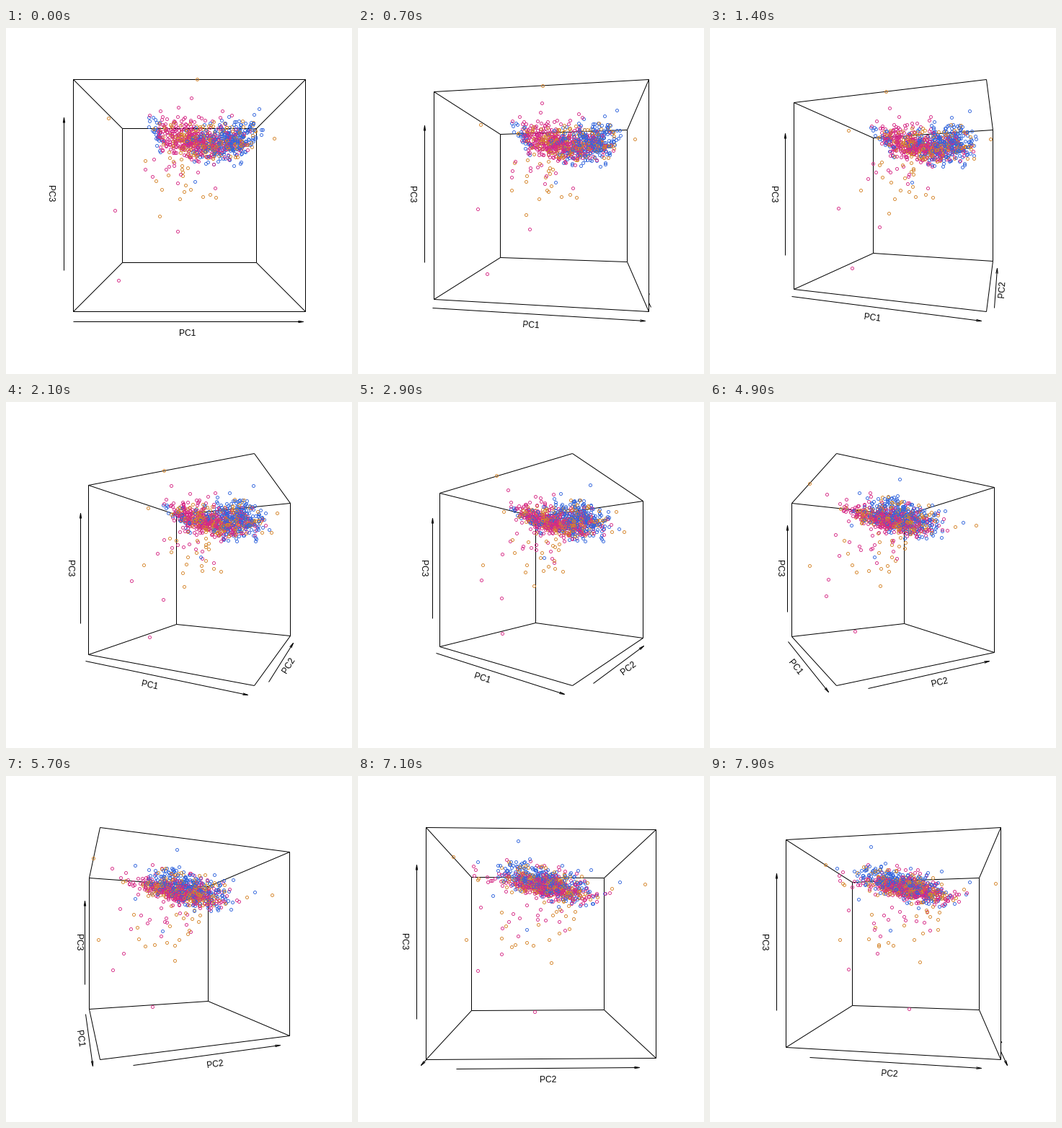
A matplotlib script that plays this animation: 480 by 480 pixels, repeating every 8 s.

```python
import itertools

import matplotlib.pyplot as plt
import numpy as np
from matplotlib.animation import FuncAnimation
from matplotlib.collections import LineCollection, PolyCollection

FRAMES, INTERVAL, STEP = 80, 100, 1.25      # degrees turned per frame
SIZE, DPI = 480, 96
PX = 72 / DPI                               # one pixel in points
CX, CY, HALF = 254.4, 232.8, 160.9          # plot centre, half box height
EYE = np.sqrt(3) + 2                        # eye distance from box centre
TICK = 0.06                                 # gap between box and arrow
PINK, GOLD, BLUE = "#d62a86", "#d5852a", "#3366dd"

# Extent of each arrow along its axis
SPAN = {"PC1": (-0.975, 0.961), "PC2": (-0.725, 0.83), "PC3": (-0.633, 0.661)}


def cloud():
    """Slanted flat cloud, strays hanging below it, and a few far points."""
    rng = np.random.default_rng(11)
    xs, colors = [], []

    def group(color, n, left, mode, right):
        xs.extend(rng.triangular(left, mode, right, n))
        colors.extend([color] * n)

    group(PINK, 390, -.47, 0, .8)
    group(GOLD, 230, -.48, .2, .87)
    group(BLUE, 300, -.1, .6, .85)
    group(BLUE, 25, -.48, -.4, -.3)
    x, n = np.array(xs), len(xs)
    y = rng.normal(.07, .24, n).clip(-.75, .75)
    spread = np.where(rng.random(n) < .2, .1, .045)
    z = .63 + .25 * (x - .3) ** 2 - .2 * (y - .07) + rng.normal(0, spread)
    order = rng.permutation(n)
    main = np.column_stack([x, y, z])[order]

    m = 28
    drip = np.column_stack([rng.normal(-.06, .22, m), rng.normal(-.1, .3, m),
                            rng.uniform(-.05, .45, m)])
    drip_colors = rng.choice([PINK, GOLD, BLUE], m, p=[.45, .47, .08])

    far = [(-.82, -.05, -.99, PINK), (-.75, -.52, -.15, PINK),
           (-.11, -.75, -.335, PINK), (.02, -.78, .91, PINK),
           (.07, -1, 1, GOLD), (-.245, -.92, .05, GOLD),
           (-.365, .16, -.25, GOLD), (-.99, .15, .95, GOLD),
           (.72, 1, .575, GOLD), (1, 0, .67, GOLD)]
    points = np.vstack([main, drip, [p[:3] for p in far]])
    return points, [*np.array(colors)[order], *drip_colors,
                    *(p[3] for p in far)]


CORNERS = np.array(list(itertools.product((-1, 1), repeat=3)), float)
EDGES = [(a, b) for a, b in itertools.combinations(range(8), 2)
         if np.abs(CORNERS[a] - CORNERS[b]).sum() == 2]


def face_loop(axis, side):
    """Corner indices around one face of the box."""
    a, b, c, d = np.flatnonzero(CORNERS[:, axis] == side)
    return [a, b, d, c]


FACES = [(axis, side, face_loop(axis, side))
         for axis in range(3) for side in (-1, 1)]


class View:
    """Perspective seen from azimuth theta, fitted to the plot region."""

    def __init__(self, theta):
        self.s, self.c = np.sin(theta), np.cos(theta)
        flat = self.flatten(CORNERS)
        self.scale = HALF / flat[:, 1].max()
        self.mid = (flat[:, 0].min() + flat[:, 0].max()) / 2
        self.eye = EYE * np.array([self.s, -self.c, 0])

    def flatten(self, p):
        x, y, z = np.atleast_2d(np.asarray(p, float)).T
        depth = EYE - (x * self.s - y * self.c)
        return np.column_stack([x * self.c + y * self.s, z]) / depth[:, None]

    def __call__(self, p):
        flat = self.flatten(p)
        return np.column_stack([CX + self.scale * (flat[:, 0] - self.mid),
                                CY - self.scale * flat[:, 1]])


def snap(p):
    return np.floor(p) + 0.5


def arrow(p, q):
    """Shaft and thin open head, in pixels."""
    p, q = snap(p), snap(q)
    back = np.arctan2(*(p - q)[::-1])
    wings = [q + 7.2 * np.array([np.cos(back + t), np.sin(back + t)])
             for t in np.radians((-10, 10))]
    return [np.array([p, q]), np.array([wings[0], q, wings[1]])]


def axis_lines(view):
    """For each axis: its direction and the corner signs it runs beside."""
    ground = [(sx, sy) for sy in (-1, 1) for sx in (-1, 1)]
    screen = view([(sx, sy, -1) for sx, sy in ground]).round(6)
    near = ground[int(np.argmax(screen[:, 1]))]
    left = ground[int(np.argmin(screen[:, 0]))]
    return {"PC1": (0, (0, near[1], -1)),
            "PC2": (1, (near[0], 0, -1)),
            "PC3": (2, (left[0], left[1], 0))}


fig = plt.figure(figsize=(SIZE / DPI, SIZE / DPI), dpi=DPI, facecolor="white")
ax = fig.add_axes([0, 0, 1, 1])
ax.set(xlim=(0, SIZE), ylim=(SIZE, 0))
ax.axis("off")

points, colors = cloud()
arrows = LineCollection([], colors="black", linewidths=PX, zorder=1)
panels = PolyCollection([], facecolors="white", edgecolors="none", zorder=2)
box = LineCollection([], colors="black", linewidths=PX, zorder=3)
for coll in (arrows, panels, box):
    ax.add_collection(coll, autolim=False)
dots = ax.scatter(*points[:, :2].T, s=(4 * PX) ** 2, facecolors="none",
                  edgecolors=colors, linewidths=0.9 * PX, zorder=4)
for coll in (arrows, panels, box, dots):
    coll.set_snap(False)
labels = {name: ax.text(0, 0, name, family="Liberation Sans",
                        fontsize=12 * PX, ha="center", va="baseline",
                        rotation_mode="anchor", zorder=1)
          for name in SPAN}


def place_label(text, spot, p, q, upright):
    """Centre a label on spot, turned along the arrow from p to q."""
    dx, dy = q - p
    if upright:
        turn = -np.pi / 2
    else:
        turn = np.arctan2(-dy if dx > 0 else dy, abs(dx))
    drop = 6
    text.set_position((spot[0] - 1.5 + drop * np.sin(turn),
                       spot[1] - 0.5 + drop * np.cos(turn)))
    text.set_rotation(np.degrees(turn))


def update(i):
    view = View(np.radians(i * STEP))
    corners = snap(view(CORNERS))

    panels.set_verts([corners[loop] for _, _, loop in FACES])
    far = [set(loop) for axis, side, loop in FACES
           if side * view.eye[axis] <= 1]
    box.set_segments([corners[[a, b]] for a, b in EDGES
                      if any({a, b} <= f for f in far)])

    segments = []
    for name, (axis, side) in axis_lines(view).items():
        lo, hi = SPAN[name]
        along, side = np.eye(3)[axis], np.array(side)
        base = side * (1 + TICK)
        spot = side * (1 + 2 * TICK) + (lo + hi) / 2 * along
        p, q, spot = view([base + lo * along, base + hi * along, spot])
        segments += arrow(p, q)
        place_label(labels[name], spot, p, q, axis == 2)
    arrows.set_segments(segments)

    dots.set_offsets(snap(view(points)))
    return [arrows, panels, box, dots, *labels.values()]


anim = FuncAnimation(fig, update, frames=FRAMES, interval=INTERVAL,
                     repeat=True, repeat_delay=0, blit=False)
plt.show()
```
